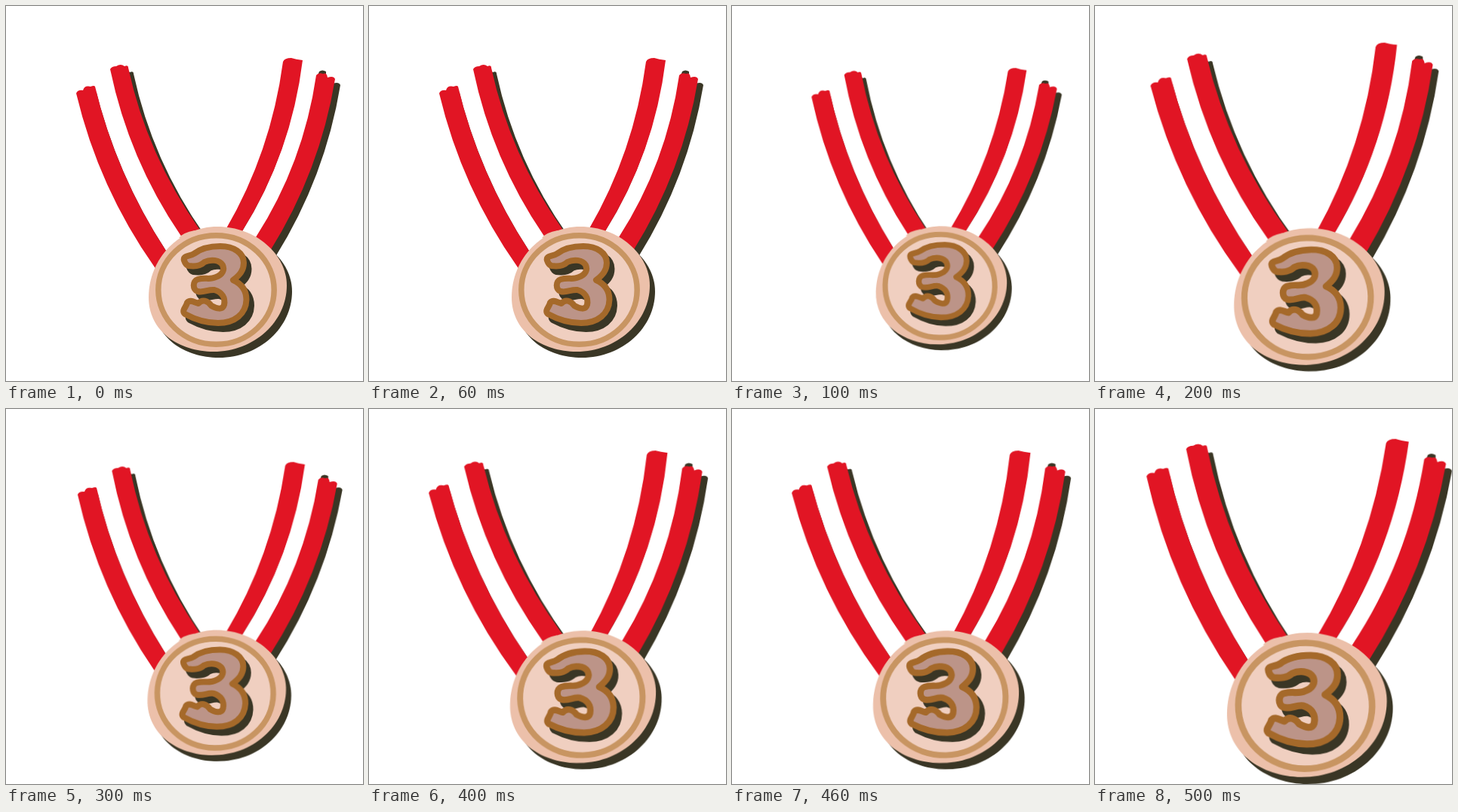
Write an HTML page that moves like this. It is 473 px wide and 498 px high and loops after 0.6 s.

```html
<!DOCTYPE html>
<html lang="en">
<head>
<meta charset="utf-8">
<title>Bronze medal</title>
<style>
  html, body { margin: 0; width: 100%; height: 100%; overflow: hidden; background: #fff; }
  svg { display: block; width: 100vw; height: 100vh; }
  .medal {
    transform-origin: 269.8px 186.3px;
    animation: wobble 600ms step-end infinite;
  }
  .shade { fill: #3a3625; }
  .red { fill: #e11524; }
  .white { fill: #fff; }
  .rim { fill: #ecc0aa; }
  .face { fill: #f0cfc0; stroke: #c89562; stroke-width: 7.5; }
  .digit { fill: #bc9488; stroke: #a5692a; stroke-width: 8; stroke-linejoin: round; }
  .digit-shade { fill: #3a3625; stroke: #3a3625; stroke-width: 8; stroke-linejoin: round; }
  @keyframes wobble {
    0%, 100% { transform: none; }
    16.6667% { transform: translate(1.5px, 4.8px) rotate(1.26deg) scale(.947); }
    33.3333% { transform: translate(-1.7px, -7.3px) rotate(-1.13deg) scale(1.092); }
    50%      { transform: translate(1.3px, .2px) rotate(.76deg) scale(1.002); }
    66.6667% { transform: translate(-2px, -4.5px) rotate(-1.24deg) scale(1.058); }
    83.3333% { transform: translate(1.7px, -12.7px) rotate(.79deg) scale(1.156); }
  }
</style>
</head>
<body>
<svg viewBox="0 0 473 498" preserveAspectRatio="none">
  <defs>
    <g id="stripes">
      <path d="M93 116 Q95 111 102 112 Q104 105 112 107 Q117 105 118 107 Q146 224 212 325 L231 355 L216 374 L197 347 Q123 242 93 116Z"/>
      <path d="M138 84 Q140 80 146 80 Q152 76 157 80 Q162 78 162 82 Q187 198 256 296 L275 326 L251 333 L231 304 Q163 204 138 84Z"/>
      <path d="M367 74 Q369 69 378 69 Q384 71 393 72 Q378 195 313 299 L295 329 L273 327 L291 297 Q351 194 367 74Z"/>
      <path d="M411 92 Q414 88 420 90 Q425 88 426 95 Q434 92 436 97 Q416 219 350 325 L330 358 L312 339 L331 307 Q394 209 411 92Z"/>
    </g>
    <path id="disc" d="M280 293 C331 293 372 330 372 371 C372 419 329 459 275 459 C229 459 189 432 189 387 C189 335 230 293 280 293Z"/>
    <path id="three" d="M236 338 C234 331 243 333 249 329 C258 322 270 319 284 319 C302 319 315 328 315 341 C315 351 310 357 301 364 C312 369 318.5 378 318.5 390 C318 409 303 421 281 421 C264 421 248 415 237 409 C232 404 239 400 240 394 C244 389 250 394 255 395 C260 389 267 391 272 398 C279 402 287 404 289 397 C291 387 286 380 276 377 C268 376 262 381 254 379 C247 377 247 365 254 363 C264 360 270 364 278 360 C287 357 290 350 287 344 C283 337 271 336 263 340 C258 345 249 346 242 345 C238 344 237 341 236 338Z"/>
  </defs>
  <g class="medal">
    <g class="shade">
      <use href="#stripes" x="7" y="8"/>
      <path d="M415 87 Q419 84 424 87 L424 98 L411 98Z"/>
      <use href="#disc" x="7" y="8"/>
    </g>
    <g class="white">
      <path d="M117 104 L138 81 Q163 204 231 304 L251 333 L231 355 L212 325 Q146 224 117 104Z"/>
      <path d="M392 70 L412 79 L411 92 Q394 209 331 307 L312 339 L295 329 L313 299 Q378 195 392 70Z"/>
    </g>
    <use class="red" href="#stripes"/>
    <g class="rim">
      <use href="#disc"/>
      <path d="M229 308 Q234 301 250 298 L250 308Z"/>
    </g>
    <ellipse class="face" cx="278.5" cy="377" rx="76.7" ry="72.3"/>
    <use class="digit-shade" href="#three" x="6.5" y="8"/>
    <use class="digit" href="#three"/>
  </g>
</svg>
</body>
</html>
```
